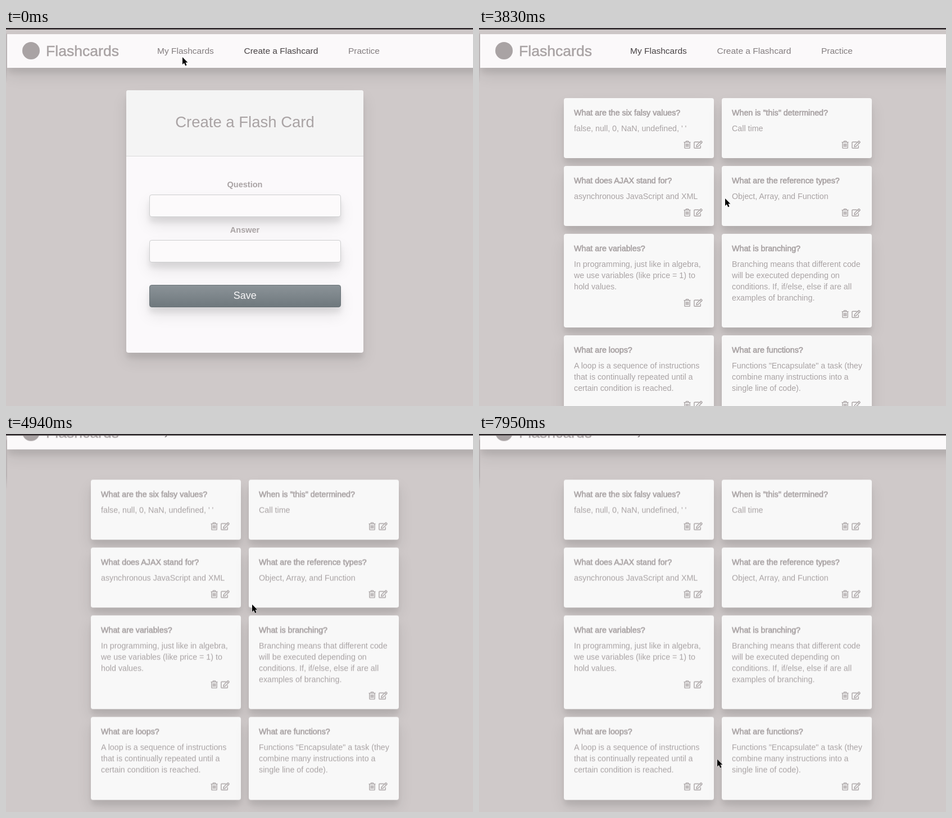
An HTML page that plays this animation: 831 by 674 pixels, repeating every 8 s.

```html
<!DOCTYPE html>
<html lang="en">
<head>
<meta charset="utf-8">
<title>Flashcards</title>
<style>
  :root {
    --bg: #cfc9c9;
    --muted: #a9a3a4;
    --link: #837d7f;
    --active: #474244;
    --shadow: 0 14px 28px rgba(0, 0, 0, .09), 0 10px 10px rgba(0, 0, 0, .075);
  }
  * { box-sizing: border-box; }
  html, body { margin: 0; width: 100%; height: 100%; overflow: hidden; background: var(--bg); }
  body { position: relative; font-family: "Liberation Sans", Arial, sans-serif; color: var(--muted); white-space: nowrap; }
  .abs, nav > *, .form > * { position: absolute; }
  .step { animation: 8s step-end infinite; }

  .page { inset: 0; animation-name: scroll; }

  nav { position: absolute; left: 2px; top: 11px; width: 900px; height: 60px; background: #fbf9fa; box-shadow: var(--shadow); line-height: 60px; font-size: 15.5px; color: var(--link); }
  .logo { left: 27px; top: 14px; width: 31px; height: 31px; border-radius: 50%; background: var(--muted); }
  .brand { left: 69px; font-size: 26.6px; color: var(--muted); -webkit-text-stroke: .5px; }
  .mine { left: 267px; animation-name: hover; }
  .create { left: 421.5px; animation-name: leave; }
  .practice { left: 607px; }

  .form { left: 214px; top: 111px; width: 422px; height: 468px; border-radius: 4px; background: #fbf9fb; box-shadow: var(--shadow); text-align: center; animation-name: formView; }
  .head { left: 0; top: 0; width: 100%; height: 118px; line-height: 114px; font-size: 27.5px; background: #f4f4f4; border-bottom: 1px solid #dadada; border-radius: 4px 4px 0 0; }
  .label { left: 0; width: 100%; line-height: 20px; font-size: 14.5px; font-weight: bold; }
  .field { left: 41px; width: 340.5px; height: 40px; border: 1px solid #cdcecf; border-radius: 4px; background: #fcfafb; box-shadow: var(--shadow); }
  .save { border-color: #687176; background: linear-gradient(#8b9398, #6f787d); color: #f7f6f7; font-size: 18px; line-height: 37px; }

  .list { left: 151px; top: 124.5px; display: grid; grid-template-columns: 267px 267px; gap: 13.7px 14px; opacity: 0; animation-name: listView; }
  .card { position: relative; padding: 16px 20px 16px 18px; border-radius: 4px; background: #f8f8f8; box-shadow: var(--shadow); font-size: 14.25px; line-height: 20px; }
  .card b { display: block; margin-bottom: 8px; font-weight: normal; -webkit-text-stroke: .65px; }
  .card p { margin: 0 0 11.5px; white-space: pre; }
  .icons { display: flex; justify-content: flex-end; gap: 5px; height: 16px; }
  .icons svg { height: 16px; fill: none; stroke: var(--muted); stroke-width: 1.4; stroke-linejoin: round; }

  .edge { left: 0; top: 0; width: 2px; height: 100%; background: linear-gradient(var(--bg) 8px, #b9b3b4 12px, #b9b3b4 74px, var(--bg) 100px); }
  .top { left: 0; top: 0; width: 100%; height: 3px; background: linear-gradient(#2e282b 2px, #6f696b 2px); }
  .status { left: 0; top: 657px; width: 281px; height: 17px; background: #000; color: #a8a8a8; border-radius: 0 4px 0 0; font-size: 10.9px; line-height: 18px; text-indent: -2px; overflow: hidden; opacity: 0; animation-name: status; }

  .cursor { left: 0; top: 0; overflow: visible; animation-name: move; }
  .arrow { animation-name: arrow; }
  .hand { opacity: 0; animation-name: hand; }

  @keyframes scroll {
    0% { transform: none; }
    55.375% { transform: translateY(-22px); }
    57.25% { transform: translateY(-41.5px); }
    59.5% { transform: translateY(-43px); }
    61.75%, 100% { transform: translateY(-43.5px); }
  }
  @keyframes hover {
    0% { color: var(--link); }
    7.5% { color: #746e70; }
    9.375% { color: #655f61; }
    11.25% { color: #565153; }
    13.125%, 100% { color: var(--active); }
  }
  @keyframes leave {
    0% { color: var(--active); }
    20.625%, 100% { color: var(--link); }
  }
  @keyframes formView { 0% { opacity: 1; } 24.375%, 100% { opacity: 0; } }
  @keyframes listView { 0% { opacity: 0; } 24.375%, 100% { opacity: 1; } }
  @keyframes status {
    0% { opacity: 0; }
    15% { opacity: .5; }
    16.875% { opacity: 1; }
    38% { opacity: .5; }
    40%, 100% { opacity: 0; }
  }
  @keyframes arrow { 0% { opacity: 1; } 5.625% { opacity: 0; } 32.125%, 100% { opacity: 1; } }
  @keyframes hand { 0% { opacity: 0; } 5.625% { opacity: 1; } 32.125%, 100% { opacity: 0; } }
  @keyframes move {
    0% { transform: translate(314px, 52px); }
    1.875% { transform: translate(315px, 51px); }
    3.75% { transform: translate(318px, 49px); }
    5.625% { transform: translate(322px, 45px); }
    7.5% { transform: translate(325px, 42px); }
    9.375% { transform: translate(326px, 41px); }
    32.125% { transform: translate(338px, 58px); }
    34% { transform: translate(358px, 88px); }
    35.875% { transform: translate(370px, 122px); }
    38% { transform: translate(368px, 162px); }
    40% { transform: translate(356px, 202px); }
    42% { transform: translate(340px, 236px); }
    44.125% { transform: translate(331px, 254px); }
    46% { transform: translate(392px, 286px); }
    47.875% { transform: translate(438px, 304px); }
    73.375% { transform: translate(424px, 315px); }
    75.25% { transform: translate(384px, 362px); }
    77% { transform: translate(352px, 408px); }
    82.625% { transform: translate(335px, 446px); }
    84.5% { transform: translate(346px, 482px); }
    88.125% { transform: translate(402px, 496px); }
    90% { transform: translate(447px, 500px); }
    93.75% { transform: translate(447px, 542px); }
    95.625% { transform: translate(446px, 572px); }
    99.375%, 100% { transform: translate(424px, 580px); }
  }
</style>
</head>
<body>
<div class="page abs step">
  <nav>
    <i class="logo"></i>
    <span class="brand">Flashcards</span>
    <span class="mine step">My Flashcards</span>
    <span class="create step">Create a Flashcard</span>
    <span class="practice">Practice</span>
  </nav>
  <div class="form abs step">
    <div class="head">Create a Flash Card</div>
    <div class="label" style="top:158px">Question</div>
    <div class="field" style="top:185.5px"></div>
    <div class="label" style="top:239px">Answer</div>
    <div class="field" style="top:266.5px"></div>
    <div class="field save" style="top:347px">Save</div>
  </div>
  <div class="list abs step"></div>
</div>
<div class="edge abs"></div>
<div class="top abs"></div>
<div class="status abs step">localhost:3000/#list</div>
<svg class="cursor abs step" width="20" height="20">
  <path class="arrow step" d="M0 0V13L3 10.3 5.2 15.2 7.5 14.2 5.4 9.4H9.4Z" fill="#000" stroke="#fff" stroke-width="1" paint-order="stroke"/>
  <path class="hand step" d="M-1.3 8.5V1.2Q-1.2 0 0 0T1.3 1.2V5Q2.6 4.2 3.5 5.4 4.8 4.8 5.6 6 7.5 5.6 7.5 7.6V10Q7.3 12 6.2 13.2V15H-.8V13.6L-4.6 9.3Q-5.4 8 -4.2 7.4T-1.3 8.5M1.3 5V8M3.5 5.4V8M5.6 6V8.4" fill="#fff" stroke="#222" stroke-width="1" stroke-linejoin="round"/>
</svg>
<script>
  const cards = [
    ["What are the six falsy values?", "false, null, 0, NaN, undefined, ' '"],
    ['When is "this" determined?', "Call time"],
    ["What does AJAX stand for?", "asynchronous JavaScript and XML"],
    ["What are the reference types?", "Object, Array, and Function"],
    ["What are variables?", "In programming, just like in algebra,\nwe use variables (like price = 1) to\nhold values."],
    ["What is branching?", "Branching means that different code\nwill be executed depending on\nconditions. If, if/else, else if are all\nexamples of branching."],
    ["What are loops?", "A loop is a sequence of instructions\nthat is continually repeated until a\ncertain condition is reached."],
    ["What are functions?", 'Functions "Encapsulate" a task (they\ncombine many instructions into a\nsingle line of code).']
  ];
  const icons = `<div class="icons">
    <svg width="13" viewBox="0 0 13 16"><path d="M.5 3.6H12.5M4 3.4 4.8 1.6H8.2L9 3.4M1.9 3.8V13.4Q1.9 14.4 2.9 14.4H10.1Q11.1 14.4 11.1 13.4V3.8M4.5 6V12M6.5 6V12M8.5 6V12"/></svg>
    <svg width="16" viewBox="0 0 16 16"><path d="M9.4 3.2H2Q.9 3.2.9 4.3V13.2Q.9 14.3 2 14.3H11.2Q12.3 14.3 12.3 13.2V9.6M5.3 8.9 12.4 1.8Q13 1.2 13.6 1.8L14.8 3Q15.4 3.6 14.8 4.2L7.7 11.3 4.9 11.7ZM11 3.2 13.4 5.6"/></svg>
  </div>`;
  document.querySelector(".list").innerHTML = cards
    .map(([question, answer]) => `<div class="card"><b>${question}</b><p>${answer}</p>${icons}</div>`)
    .join("");
</script>
</body>
</html>
```
